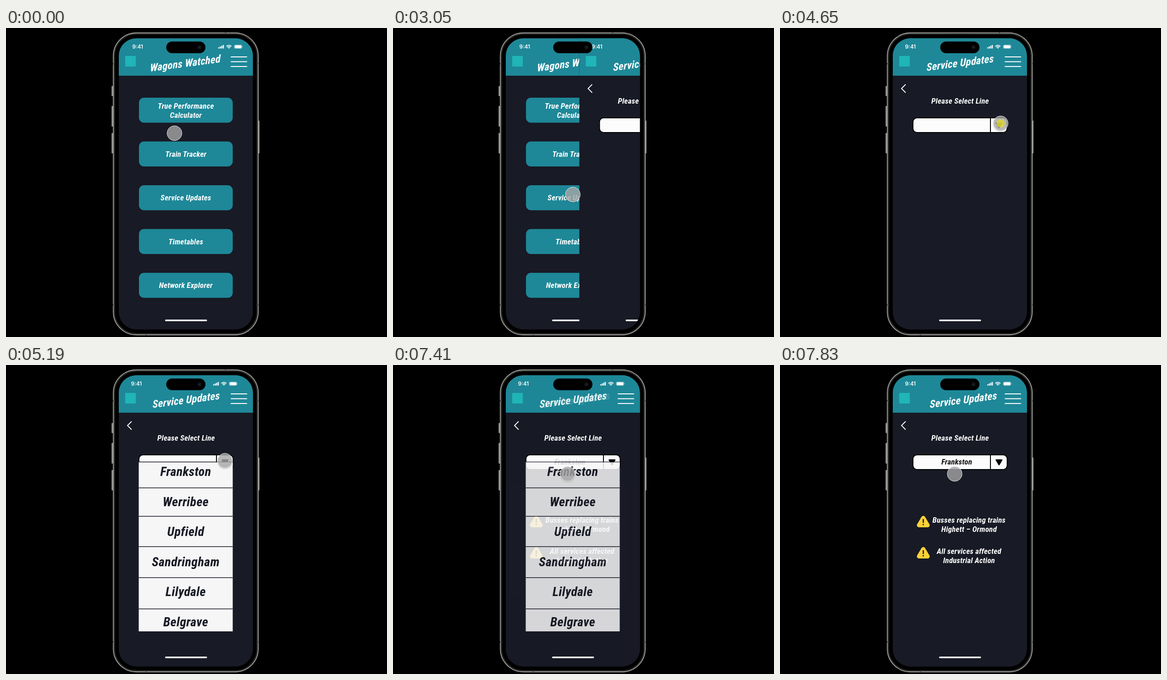
An HTML page that plays this animation: 831 by 674 pixels, repeating every 8000 ms.

```html
<!DOCTYPE html>
<html lang="en">
<head>
<meta charset="utf-8">
<title>Train service app</title>
<style>
html, body { margin: 0; width: 100%; height: 100%; overflow: hidden; background: #000; }
svg { display: block; width: 100vw; height: 100vh; }
text { text-anchor: middle; fill: #fff; font: italic 700 17px 'Roboto Condensed', 'Open Sans', 'Noto Sans', sans-serif; font-stretch: 75%; letter-spacing: .2px; }
.title { font-size: 23px; }
.row { font-size: 28px; fill: #181a25; letter-spacing: .4px; }
.dark { fill: #111; }
.clock { font: 600 11.6px Inter, sans-serif; letter-spacing: 0; }
</style>
</head>
<body>
<svg viewBox="0 0 831 674">
  <defs>
    <clipPath id="screen"><rect x="246" y="22.5" width="292.5" height="635" rx="38"/></clipPath>
    <linearGradient id="key"><stop stop-color="#c4c4c0"/><stop offset="1" stop-color="#555"/></linearGradient>
  </defs>
  <rect width="831" height="674"/>
  <g fill="url(#key)">
    <rect x="230.5" y="126.5" width="3.5" height="22" rx="1"/>
    <rect x="230.5" y="170" width="3.5" height="45" rx="1"/>
    <rect x="230.5" y="229" width="3.5" height="44.5" rx="1"/>
    <rect x="550" y="202" width="3.2" height="71.5" rx="1"/>
  </g>
  <g fill="none">
    <rect x="234.2" y="10.8" width="315.8" height="658.4" rx="50" stroke="#a9a9a5" stroke-width="1.9"/>
    <rect x="236.8" y="13.2" width="310.6" height="653.6" rx="47.5" stroke="#3c3c3a" stroke-width="1.4"/>
    <path d="M233 78h4M233 604h4M548 78h4M548 604h4M306 667v4M479 9v4" stroke="#444" stroke-width="2.5"/>
    <path d="M363 13.5H422" stroke="#1c1c1c" stroke-width="3" stroke-linecap="round"/>
  </g>
  <g clip-path="url(#screen)">
    <g id="home"></g>
    <g id="picker"></g>
    <g id="result"></g>
    <rect x="349.5" y="29.5" width="85.5" height="25.5" rx="12.7"/>
    <circle cx="422" cy="42.3" r="5" fill="#0d1115"/>
    <circle cx="422" cy="42.3" r="1.8" fill="#202833"/>
  </g>
  <g id="cursor">
    <circle cy="1.5" r="17" fill="#000" opacity=".14"/>
    <circle r="16.2" fill="#adadad" fill-opacity=".77" stroke="#fff" stroke-opacity=".8"/>
    <circle id="press" r="9" fill="#e0da20" opacity=".75"/>
  </g>
</svg>
<script>
const LOOP = 8000;
const $ = id => document.getElementById(id);
const text = (x, y, s, cls = '') => `<text x="${x}" y="${y}" class="${cls}">${s}</text>`;

const statusIcons = x => `<g transform="translate(${x} 0)" fill="#fff">
  ${[0, 1, 2, 3].map(i => `<rect x="${i * 3.3}" y="${42 - i * 1.7}" width="2.3" height="${2.8 + i * 1.7}" rx=".6"/>`).join('')}
  <g fill="none" stroke="#fff" stroke-width="1.7"><path d="M17.6 40q5.6-4.8 11.2 0M19.7 42.2q3.5-2.9 7 0"/></g>
  <path d="M21.4 43.4q1.8-1.4 3.6 0l-1.8 1.8z"/>
  <rect x="34.7" y="36.8" width="17" height="8" rx="2.4" fill="none" stroke="#fff" stroke-opacity=".4" stroke-width=".8"/>
  <rect x="35.7" y="37.6" width="15" height="6.6" rx="1.6"/>
  <rect x="52.4" y="39.4" width="1" height="2.8" rx=".5" opacity=".5"/></g>`;

const page = (title, titleX, titleY, clockX, iconX, body) => `
  <rect x="246" y="22" width="293" height="636" fill="#181a25"/>
  <rect x="246" y="22" width="293" height="82" fill="#1e8898"/>
  ${text(clockX, 45, '9:41', 'clock')}${statusIcons(iconX)}
  <rect x="260" y="61" width="23" height="23" fill="#20b5b8"/>
  <g transform="translate(${titleX} ${titleY}) rotate(-7.5) skewX(-8)">${text(0, 0, title, 'title')}</g>
  <path d="M491 63H525M491 73.5H525M491 84H525" stroke="#fff" stroke-width="2.1" stroke-linecap="round"/>
  ${body}
  <rect x="347" y="636" width="91.5" height="3.6" rx="1.8" fill="#fff"/>`;

const buttons = [['True Performance', 'Calculator'], ['Train Tracker'], ['Service Updates'], ['Timetables'], ['Network Explorer']];
const menu = buttons.map((lines, i) => {
  const y = 152 + i * 95.5;
  return `<rect x="290" y="${y}" width="204.5" height="54.5" rx="11" fill="#1e8898"/>` +
    lines.map((s, j) => text(392.3, y + (lines.length > 1 ? 24 + j * 20.3 : 33), s)).join('');
}).join('');

const selector = value => `
  <path d="M274 123L265 132L274 141" fill="none" stroke="#fff" stroke-width="1.8"/>
  ${text(392.8, 165, 'Please Select Line')}
  <rect x="290" y="196" width="205.5" height="32" rx="9" fill="#fcfcfc" stroke="#000" stroke-width="2"/>
  <path d="M459 196v32" stroke="#000" stroke-width="2"/>
  <path d="M471.5 207H484L477.7 217.5z" stroke="#000" stroke-width="2.5" stroke-linejoin="round"/>
  ${text(385.5, 217.3, value, 'dark')}`;

const lines = ['Frankston', 'Werribee', 'Upfield', 'Sandringham', 'Lilydale', 'Belgrave'];
const list = `<g id="list"><rect x="289.5" y="211" width="205" height="370" fill="#f6f6f7"/>
  <path d="${[211.5, 268, 330, 396.3, 463.8, 532].map(y => `M289.5 ${y}h205`).join('')}" stroke="#181a25" stroke-width="1.5"/>
  ${lines.map((s, i) => text(392, 242 + i * 65.5, s, 'row')).join('')}</g>`;

const alert = (y, a, b) => `<g transform="translate(0 ${y})">
  <path d="M312.5 5.5L303 21.500H322z" fill="#fdd237" stroke="#fdd237" stroke-width="9" stroke-linejoin="round"/>
  <path d="M312.5 9v6.500" stroke="#181a25" stroke-width="2.6" stroke-linecap="round"/>
  <circle cx="312.500" cy="20" r="1.6" fill="#181a25"/>
  ${text(412.3, 16, a)}${text(412.3, 36.3, b)}</g>`;

$('home').innerHTML = page('Wagons Watched', 391, 85, 287.3, 463, menu);
$('picker').innerHTML = page('Service Updates', 393, 84, 284.5, 452, selector('') + list);
$('result').innerHTML = page('Service Updates', 400, 84, 284.5, 452, selector('Frankston') +
  alert(328, 'Busses replacing trains', 'Highett – Ormond') +
  alert(396, 'All services affected', 'Industrial Action'));

// Progress 0..1 in n even jumps, the first at `from`, the last at `to`.
const steps = (t, from, to, n) => {
  const k = Math.floor((t - from) / (to - from) * (n - 1) + 1.1);
  return t < from ? 0 : Math.min(k, n) / n;
};
const smooth = p => p * p * (3 - 2 * p);
const bezier = (p, a, b, c, d) => {
  const q = 1 - p;
  return q * q * q * a + 3 * q * q * p * b + 3 * q * p * p * c + p * p * p * d;
};

// from, to, jumps, x controls, y controls
const moves = [
  [120, 190, 2, [367.5, 368, 368, 368.5], [229.5, 230, 230, 230.5]],
  [980, 1650, 8, [368.5, 355, 396, 392.3], [230.5, 258, 345, 363.3]],
  [3570, 4120, 8, [392.3, 430, 470, 481.3], [363.3, 290, 138, 208]],
  [5190, 5820, 10, [481.3, 440, 296, 381], [208, 215, 296, 237.5]]
];

function draw(t) {
  const [from, to, n, xs, ys] = moves.filter(m => t >= m[0]).pop() || moves[0];
  const p = smooth(steps(t, from, to, n));
  $('cursor').setAttribute('transform', `translate(${bezier(p, ...xs)} ${bezier(p, ...ys)})`);

  const pressed = t >= 4600 && t < 4730;
  $('press').setAttribute('visibility', pressed ? 'visible' : 'hidden');
  $('press').setAttribute('r', t < 4650 ? 6 : 9);

  const slide = steps(t, 2970, 3370, 7);
  $('picker').setAttribute('visibility', slide ? 'visible' : 'hidden');
  $('picker').setAttribute('transform', `translate(${293 * (1 - slide) ** 1.79} 0)`);
  $('list').setAttribute('display', t >= 4730 ? 'inline' : 'none');
  $('result').setAttribute('opacity', steps(t, 7410, 7830, 7));
}

const begin = performance.now();
function tick() {
  draw((performance.now() - begin) % LOOP);
  requestAnimationFrame(tick);
}
tick();
</script>
</body>
</html>
```
